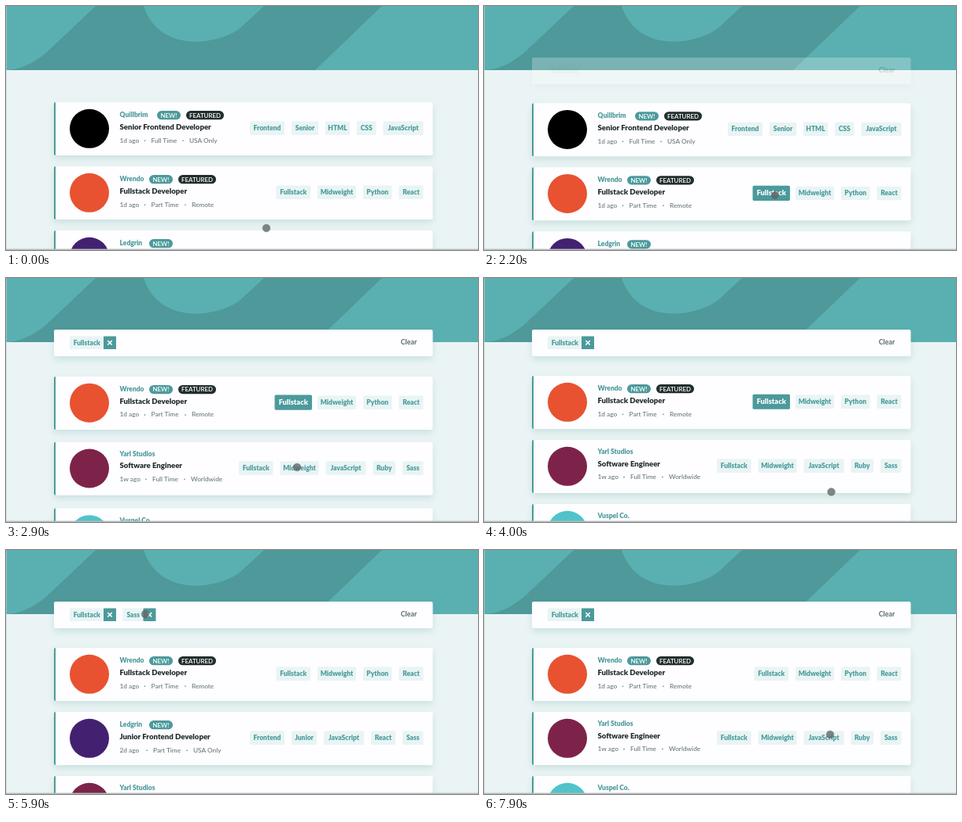
An HTML page for the animation above (8000 ms loop, 600 px wide and 312 px high).

```html
<!DOCTYPE html>
<html lang="en">
<head>
<meta charset="utf-8">
<title>Job listings</title>
<style>
  html, body { margin: 0; width: 100%; height: 100%; overflow: hidden; background: #ebf4f4; }
  svg { display: block; width: 100vw; height: 100vh; }
  text { font-family: Lato, "Open Sans", sans-serif; }
  .name, .tag { font-size: 8.5px; font-weight: 900; fill: #4c9a9b; }
  .title { font-size: 9.6px; font-weight: 900; fill: #202b2c; }
  .meta { font-size: 8.3px; font-weight: 500; fill: #697879; }
  .badge { font-size: 7.9px; font-weight: 600; fill: #fff; }
  .clear { font-size: 8.9px; font-weight: 700; fill: #5c6b6c; }
  .panel { fill: #fefdff; filter: drop-shadow(0 4px 4px rgba(70, 150, 152, .2)); }
</style>
</head>
<body>
<svg id="stage" viewBox="0 0 600 312" preserveAspectRatio="none"></svg>
<script>
const TEAL = '#4c9a9b', DARK = '#222d2e', PALE = '#e9f4f4';
const LOOP = 8000, STEP = 100, PITCH = 82;
const stage = document.getElementById('stage');

function add(parent, tag, attrs = {}, text) {
  const node = document.createElementNS('http://www.w3.org/2000/svg', tag);
  for (const key in attrs) node.setAttribute(key, attrs[key]);
  if (text) node.textContent = text;
  parent.append(node);
  return node;
}
const set = (node, key, value) => node.setAttribute(key, value);
const box = (parent, x, y, width, height, fill, rx = 0) =>
  add(parent, 'rect', { x, y, width, height, fill, rx });
const label = (parent, cls, x, y, text, anchor = 'start') =>
  add(parent, 'text', { class: cls, x, y, 'text-anchor': anchor }, text);

// Timing helpers
const ramp = (t, start, length) => Math.min(1, Math.max(0, (t - start) / length));
const easeOut = p => 1 - (1 - p) ** 3;
const smooth = p => p * p * (3 - 2 * p);

// Backdrop
box(stage, 0, 0, 600, 312, '#ebf4f4');
box(stage, 0, 0, 600, 82, '#5ab0b1');
add(stage, 'path', {
  fill: '#4f999b',
  d: 'M114 0L56 55C40 70 24 80 2 82H393L478 0H328L300 26C280 46 204 64 178 8L175 0Z'
});

// Job cards
const tagWidth = {
  Frontend: 44, Senior: 34, HTML: 31, CSS: 24.5, JavaScript: 51, Fullstack: 43.5,
  Midweight: 49, Python: 36.5, React: 31, Ruby: 28.5, Sass: 26.5, Junior: 32
};

function makeTag(parent, word, x) {
  const w = tagWidth[word], cx = x + w / 2;
  const node = add(parent, 'g');
  box(node, x, 24.5, w, 17.5, PALE, 1.5);
  label(node, 'tag', cx, 36, word, 'middle');
  const hover = add(node, 'g', { opacity: 0 });
  box(hover, x, 24.5, w, 17.5, TEAL, 1.5);
  label(hover, 'tag', cx, 36, word, 'middle').style.fill = '#fff';
  return {
    setHover(p) {
      set(hover, 'opacity', p);
      set(node, 'transform', `translate(${cx} 33.2) scale(${1 + .09 * p}) translate(${-cx} -33.2)`);
    }
  };
}

function makeBadge(parent, x, width, text, fill) {
  box(parent, x, 11, width, 11.3, fill, 5.6);
  label(parent, 'badge', x + width / 2, 19.5, text, 'middle');
}

function makeCard({ name, title, color, age, hours, place, metaX, newX, featuredX, words }) {
  const root = add(stage, 'g');
  const lift = newX ? 0 : 1.6;
  add(root, 'rect', { class: 'panel', x: 61, y: 0, width: 481.5, height: 68, rx: 2 });
  add(root, 'path', { d: 'M63 0V68Q61 68 61 66V2Q61 0 63 0Z', fill: TEAL });
  add(root, 'circle', { cx: 106, cy: 33.8, r: 25, fill: color });
  label(root, 'name', 144.5, 18.9 - lift / 3, name);
  if (newX) makeBadge(root, newX, 30, 'NEW!', TEAL);
  if (featuredX) makeBadge(root, featuredX, 48, 'FEATURED', DARK);
  label(root, 'title', 144.5, 35.2 - lift, title);
  [age, hours, place].forEach((text, i) => {
    const x = [144.5, ...metaX][i];
    label(root, 'meta', x, 51.6 - lift, text);
    if (i) add(root, 'circle', { cx: x - 8, cy: 49.2 - lift, r: .8, fill: '#697879' });
  });
  const tags = {};
  let right = 530.5;
  for (const word of [...words].reverse()) {
    right -= tagWidth[word];
    tags[word] = makeTag(root, word, right);
    right -= 9;
  }
  return { root, tags };
}

const senior = makeCard({
  name: 'Quillbrim', title: 'Senior Frontend Developer', color: '#000',
  age: '1d ago', hours: 'Full Time', place: 'USA Only', metaX: [184.5, 233],
  newX: 192, featuredX: 229, words: ['Frontend', 'Senior', 'HTML', 'CSS', 'JavaScript']
});
const fullstack = makeCard({
  name: 'Wrendo', title: 'Fullstack Developer', color: '#e85230',
  age: '1d ago', hours: 'Part Time', place: 'Remote', metaX: [184.5, 236],
  newX: 182, featuredX: 219, words: ['Fullstack', 'Midweight', 'Python', 'React']
});
const junior = makeCard({
  name: 'Ledgrin', title: 'Junior Frontend Developer', color: '#432170',
  age: '2d ago', hours: 'Part Time', place: 'USA Only', metaX: [187, 238],
  newX: 182, words: ['Frontend', 'Junior', 'JavaScript', 'React', 'Sass']
});
const software = makeCard({
  name: 'Yarl Studios', title: 'Software Engineer', color: '#7d2349',
  age: '1w ago', hours: 'Full Time', place: 'Worldwide', metaX: [186, 235],
  words: ['Fullstack', 'Midweight', 'JavaScript', 'Ruby', 'Sass']
});
const engineer = makeCard({
  name: 'Vuspel Co.', title: 'Fullstack Engineer', color: '#50c3ca',
  age: '3w ago', hours: 'Full Time', place: 'Worldwide', metaX: [186, 235],
  words: ['Fullstack', 'Midweight', 'JavaScript', 'Python']
});

// Filter bar
const bar = add(stage, 'g');
add(bar, 'rect', { class: 'panel', x: 61, y: 66, width: 481.5, height: 34, rx: 2 });
label(bar, 'clear', 512, 85, 'Clear', 'middle');

function makeChip(word, x) {
  const w = tagWidth[word], root = add(bar, 'g');
  box(root, x, 74.5, w, 16.5, PALE, 1.5);
  label(root, 'tag', x + w / 2, 86, word, 'middle');
  const button = box(root, x + w - .5, 74.5, 16, 16.5, TEAL, .5);
  const cross = add(root, 'path', {
    d: `M${x + w + 4.8} 80.1l5.4 5.4m0 -5.4l-5.4 5.4`, stroke: '#fff', 'stroke-width': 1.5
  });
  return (opacity, width, crossOpacity) => {
    set(root, 'opacity', opacity);
    set(button, 'width', 16 * width);
    set(cross, 'opacity', crossOpacity);
  };
}
const chipFullstack = makeChip('Fullstack', 81);
const chipSass = makeChip('Sass', 148.5);

// Window edges
box(stage, 0, 0, 1, 312, 'rgba(190,208,208,.6)');
box(stage, 0, 310.6, 600, 1.4, '#b4bcbc');

// Pointer: time, x, y
const pointer = add(stage, 'circle', { fill: '#62686b', stroke: '#55595b', 'stroke-width': .6 });
const route = [
  [0, 331, 284], [500, 331, 284], [1600, 376, 254], [2000, 370, 242], [3100, 370, 242],
  [4000, 441.5, 273.5], [4500, 520, 242], [5150, 521.5, 241], [5900, 177, 82],
  [6150, 183, 83], [6500, 183, 83], [7900, 440, 236]
];

function pointerAt(t) {
  const i = Math.max(1, route.findIndex(stop => stop[0] >= t));
  const end = route[t > 7900 ? route.length - 1 : i];
  const start = route[t > 7900 ? route.length - 1 : i - 1];
  const p = smooth(ramp(t, start[0], end[0] - start[0] || 1));
  return [1, 2].map(k => start[k] + (end[k] - start[k]) * p);
}

function draw(t) {
  const barIn = ramp(t, 2150, 200);
  set(bar, 'opacity', barIn);

  // Each card fades, then its slot closes
  const firstFade = 1 - ramp(t, 2250, 300);
  const firstSlot = 1 - easeOut(ramp(t, 2550, 450));
  const back = t >= 4650;
  const juniorFade = back ? ramp(t, 4900, 400) - ramp(t, 6350, 300) : firstFade;
  const juniorSlot = back
    ? easeOut(ramp(t, 4650, 600)) - easeOut(ramp(t, 6650, 450))
    : firstSlot;

  let y = 123 + 2 * easeOut(barIn);
  function place(card, opacity = 1, slot = 1, hiddenBefore = 0) {
    y += PITCH * hiddenBefore;
    set(card.root, 'opacity', Math.max(0, opacity));
    set(card.root, 'transform', `translate(0 ${y}) scale(1 ${Math.max(.001, slot)})`);
    y += PITCH * slot;
  }
  place(senior, firstFade, firstSlot);
  place(fullstack);
  place(junior, juniorFade, juniorSlot);
  place(software, 1, 1, firstSlot);
  place(engineer, 1, 1, 3 * firstSlot);

  fullstack.tags.Fullstack.setHover(ramp(t, 1850, 200) - ramp(t, 4850, 300));
  software.tags.Sass.setHover(ramp(t, 4400, 200) - ramp(t, 6300, 200));

  chipFullstack(barIn, ramp(t, 2290, 195), ramp(t, 2480, 120));
  chipSass(ramp(t, 4650, 150) - ramp(t, 6300, 200), ramp(t, 4700, 200), ramp(t, 4850, 120));

  const [cx, cy] = pointerAt(t);
  const pressed = [2300, 4800, 6200].some(at => Math.abs(t - at) <= 150);
  set(pointer, 'cx', cx);
  set(pointer, 'cy', cy);
  set(pointer, 'r', pressed ? 4.5 : 4.8);
  set(pointer, 'opacity', pressed ? .9 : .8);
}

const begin = performance.now();
function tick() {
  const t = (performance.now() - begin) % LOOP;
  draw(Math.floor(t / STEP) * STEP);
  requestAnimationFrame(tick);
}
tick();
</script>
</body>
</html>
```
